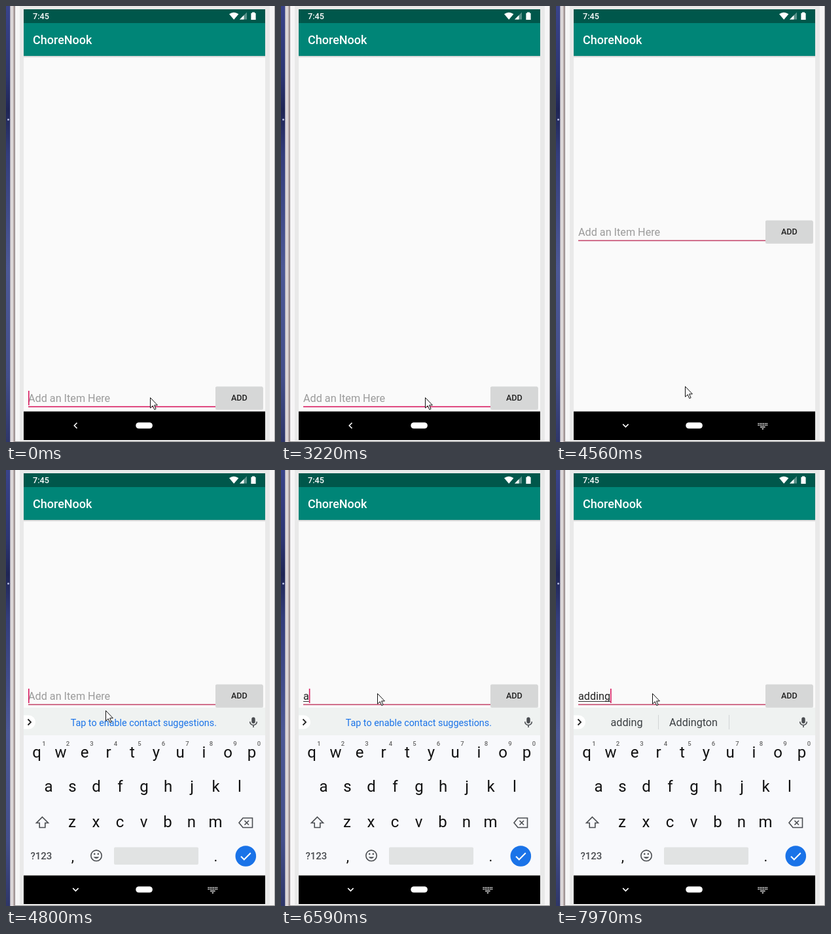
Recreate the animation shown at these times as an HTML page. Size 411x664 px, loop 8 s.

```html
<!DOCTYPE html>
<html lang="en">
<head>
<meta charset="utf-8">
<title>Todo input</title>
<style>
  html, body { margin: 0; width: 100%; height: 100%; overflow: hidden; background: #f4f3f4; }
  svg { display: block; width: 411px; height: 664px; font-family: Roboto, sans-serif; }
  .mid { text-anchor: middle; }
  .med { font-weight: 500; }
  .line { fill: none; stroke: #4a4d51; stroke-width: 1.6; }
</style>
</head>
<body>
<svg viewBox="0 0 411 664">
  <defs>
    <linearGradient id="photo" x2="0" y2="1">
      <stop offset="0" stop-color="#39438a"/>
      <stop offset=".16" stop-color="#2c3573"/>
      <stop offset=".24" stop-color="#1f2555"/>
      <stop offset=".34" stop-color="#333d7c"/>
      <stop offset=".6" stop-color="#4c5896"/>
      <stop offset=".85" stop-color="#434e8b"/>
      <stop offset="1" stop-color="#2e3669"/>
    </linearGradient>
    <linearGradient id="shade" x2="0" y2="1">
      <stop offset="0" stop-opacity=".2"/>
      <stop offset="1" stop-opacity="0"/>
    </linearGradient>
    <clipPath id="board"><rect x="27" y="362" width="369" height="255"/></clipPath>
  </defs>

  <!-- window edge and device frame -->
  <rect width="411" height="664" fill="#f6f5f6"/>
  <rect width="6" height="664" fill="url(#photo)"/>
  <circle cx="3.5" cy="173" r="1.5" fill="#b9c0e4"/>
  <rect x="6" width="5" height="664" fill="#dcd6d8"/>
  <rect x="6" width="1" height="664" fill="#a9a6b6"/>
  <rect x="11" width="2" height="664" fill="#b3a6a6"/>
  <rect x="13" width="1" height="664" fill="#8f8587"/>
  <rect x="21" width="382" height="662" fill="#e9e9e9"/>
  <rect x="410" width="1" height="664" fill="#aaa"/>
  <rect x="14" y="663" width="397" height="1" fill="#8c8c8c"/>

  <!-- screen -->
  <rect x="27" y="5" width="369" height="656" fill="#fafafa"/>
  <rect x="27" y="76" width="369" height="3" fill="url(#shade)"/>
  <rect x="27" y="26" width="369" height="50" fill="#008577"/>
  <rect x="27" y="5" width="369" height="21" fill="#00574b"/>
  <g fill="#fff" class="med">
    <text x="41" y="20" font-size="12.6">7:45</text>
    <text x="41" y="58" font-size="18">ChoreNook</text>
    <path d="M341 12.3Q348 7 355.4 12.3L348.2 20.7Z"/>
    <path d="M368 9.5V20.5H357Z" opacity=".35"/>
    <path d="M363.5 14V20.5H357Z"/>
    <path d="M376 9.5h4v1.3h1.6v10.2h-7.2v-10.2h1.6z"/>
  </g>

  <g id="field">
    <text id="hint" x="34" y="603" font-size="16.2" fill="#9b9b9b">Add an Item Here</text>
    <text id="typed" x="34" y="603" font-size="16.2" fill="#222"></text>
    <rect id="mark" x="34" y="605" height="1" fill="#333"/>
    <rect id="rule" x="34" y="609.5" width="287" height="1.6"/>
    <rect id="caret" y="586" width="1.6" height="22" fill="#d81b60"/>
    <rect x="320" y="580.5" width="73" height="34.5" rx="2" opacity=".13"/>
    <rect x="320" y="579.5" width="72.5" height="34" rx="2" fill="#d6d7d7"/>
    <text x="356.3" y="601" font-size="12.6" class="mid med" fill="#222">ADD</text>
  </g>

  <g clip-path="url(#board)">
    <g id="keyboard">
      <rect x="27" y="362" width="369" height="42" fill="#eff2f1"/>
      <rect x="27" y="404" width="369" height="214" fill="#f8f9fc"/>
      <path d="M27 373.5h7.5a10.5 10.5 0 0 1 0 21H27z" fill="#fff"/>
      <path d="M33.5 379.5l4.5 4.5-4.5 4.5" class="line" style="stroke:#222;stroke-width:1.8"/>
      <text id="tip" x="210.3" y="390" font-size="14.35" class="mid" fill="#1a73e8">Tap to enable contact suggestions.</text>
      <g id="picks" font-size="16.2" class="mid" fill="#3c4043">
        <path d="M156.5 373v22M264.5 373v22" stroke="#d2d5d6"/>
        <text x="108" y="390"></text>
        <text x="210" y="390"></text>
        <text x="318" y="390"></text>
      </g>
      <rect x="375.3" y="376.5" width="5.4" height="9.5" rx="2.7" fill="#4a4d51"/>
      <path d="M372.7 383.2a5.3 5.3 0 0 0 10.6 0M378 388.5v3.5" class="line"/>
      <g id="keys" class="mid" fill="#111"></g>
      <path d="M55.5 528.5l9 9h-4.7v7h-8.6v-7h-4.7z" class="line"/>
      <path d="M362 530h14.5v14.5H362l-6-7.25z" class="line"/>
      <path d="M364.5 534l6.5 6.5m0-6.5l-6.5 6.5" class="line"/>
      <circle cx="138" cy="587.3" r="8.2" class="line"/>
      <path d="M133.7 589.2q4.3 5 8.6 0z" fill="#4a4d51"/>
      <circle cx="135.2" cy="584.8" r="1.3" fill="#4a4d51"/>
      <circle cx="140.8" cy="584.8" r="1.3" fill="#4a4d51"/>
      <text x="37.5" y="593" font-size="15" class="med" fill="#4a4d51">?123</text>
      <rect x="165" y="574.5" width="129" height="26.5" rx="2" fill="#e1e3e3"/>
      <circle cx="366.3" cy="588" r="15.8" fill="#1a73e8"/>
      <path d="M359 588.5l4.8 4.8 10-10" class="line" style="stroke:#fff;stroke-width:2"/>
    </g>
  </g>

  <!-- navigation bar -->
  <rect x="27" y="617.5" width="369" height="43.5"/>
  <path id="back" d="M108.5 634.8l-4.2 4.2 4.2 4.2" fill="none" stroke="#fff" stroke-width="1.6"/>
  <rect x="198.3" y="634.2" width="25.6" height="9.4" rx="4.7" fill="#fff"/>
  <g id="switcher" stroke="#fff" fill="none">
    <path d="M308.5 635.9h14.6M308.5 638.6h14.6" stroke-width="1.5" stroke-dasharray="1.6 1"/>
    <path d="M312 641.2h7.6" stroke-width="1.3"/>
    <path d="M314 643.3h3.8l-1.9 1.9z" fill="#fff" stroke="none"/>
  </g>
  <path id="cursor" d="M.5.5V16.2L4.2 12.8L6.8 18.6L9.1 17.6L6.6 11.9H11.4Z" fill="#fff" stroke="#111"/>
</svg>
<script>
const LOOP = 8000;
const $ = id => document.getElementById(id);
const show = (id, on) => $(id).setAttribute("display", on ? "inline" : "none");

// Each track is a list of [start time, value...]; values hold until the next entry.
const pointer = [[0, 220, 596], [3770, 212, 596], [3890, 202, 595], [4010, 203, 603], [4560, 197, 579],
  [4680, 183, 505], [4800, 152, 366], [4920, 152, 346], [5070, 149, 342], [5190, 147, 340]];
const blinks = [280, 680, 1210, 1730, 2290, 2720, 3220, 4800, 5190, 5750, 6000, 6590];
const typing = [[0, ""], [6590, "a"], [6840, "ad"], [6960, "add"], [7360, "addi"], [7480, "addin"], [7850, "adding"]];
const picks = [[0], [6960, "add", "and", "ad"], [7360, "addi", "adding", "adds"],
  [7480, "adding", "addin", "Add"], [7970, "adding", "Addington", ""]];
const turn = [[0, 0], [4010, -45], [4290, -90]];
const slide = [[0, 255], [4680, 36], [4800, 0]];

const at = (track, t) => track.filter(step => step[0] <= t).pop().slice(1);

function addKey(x, y, label, size, extra = "") {
  $("keys").insertAdjacentHTML("beforeend", `<text x="${x}" y="${y}" font-size="${size}" ${extra}>${label}</text>`);
}

function buildKeys() {
  const rows = [["qwertyuiop", 47, 438], ["asdfghjkl", 65, 490], ["zxcvbnm", 101, 543.5]];
  for (const [letters, left, y] of rows)
    [...letters].forEach((c, i) => addKey(left + i * 36.5, y, c, 24));
  for (let i = 0; i < 10; i++)
    addKey(58 + i * 36.5, 420, (i + 1) % 10, 9.5, 'class="med" fill="#666"');
  addKey(102, 595.5, ",", 22);
  addKey(320.5, 595.5, ".", 22);
}

function draw(t) {
  const raised = t >= 4010;
  const [text] = at(typing, t);
  const words = at(picks, t);
  const [dy] = at(slide, t);

  $("field").setAttribute("transform", `translate(0 ${raised ? -253 : 0})`);
  $("rule").setAttribute("fill", raised ? "#c64a6e" : "#d81b60");
  show("hint", !text);
  $("typed").textContent = text;
  const width = text ? $("typed").getComputedTextLength() : 0;
  $("mark").setAttribute("width", width);
  $("caret").setAttribute("x", 34 + width);
  show("caret", blinks.filter(b => b <= t).length % 2 === 0);

  show("keyboard", t >= 4680);
  $("keyboard").setAttribute("transform", `translate(0 ${dy})`);
  show("tip", !words.length);
  show("picks", words.length > 0);
  document.querySelectorAll("#picks text").forEach((el, i) => el.textContent = words[i] || "");

  $("back").setAttribute("transform", `rotate(${at(turn, t)[0]} 106.4 639)`);
  show("switcher", raised);
  $("cursor").setAttribute("transform", `translate(${at(pointer, t).join(" ")})`);
}

function tick() {
  draw(performance.now() % LOOP);
  requestAnimationFrame(tick);
}

buildKeys();
tick();
</script>
</body>
</html>
```
